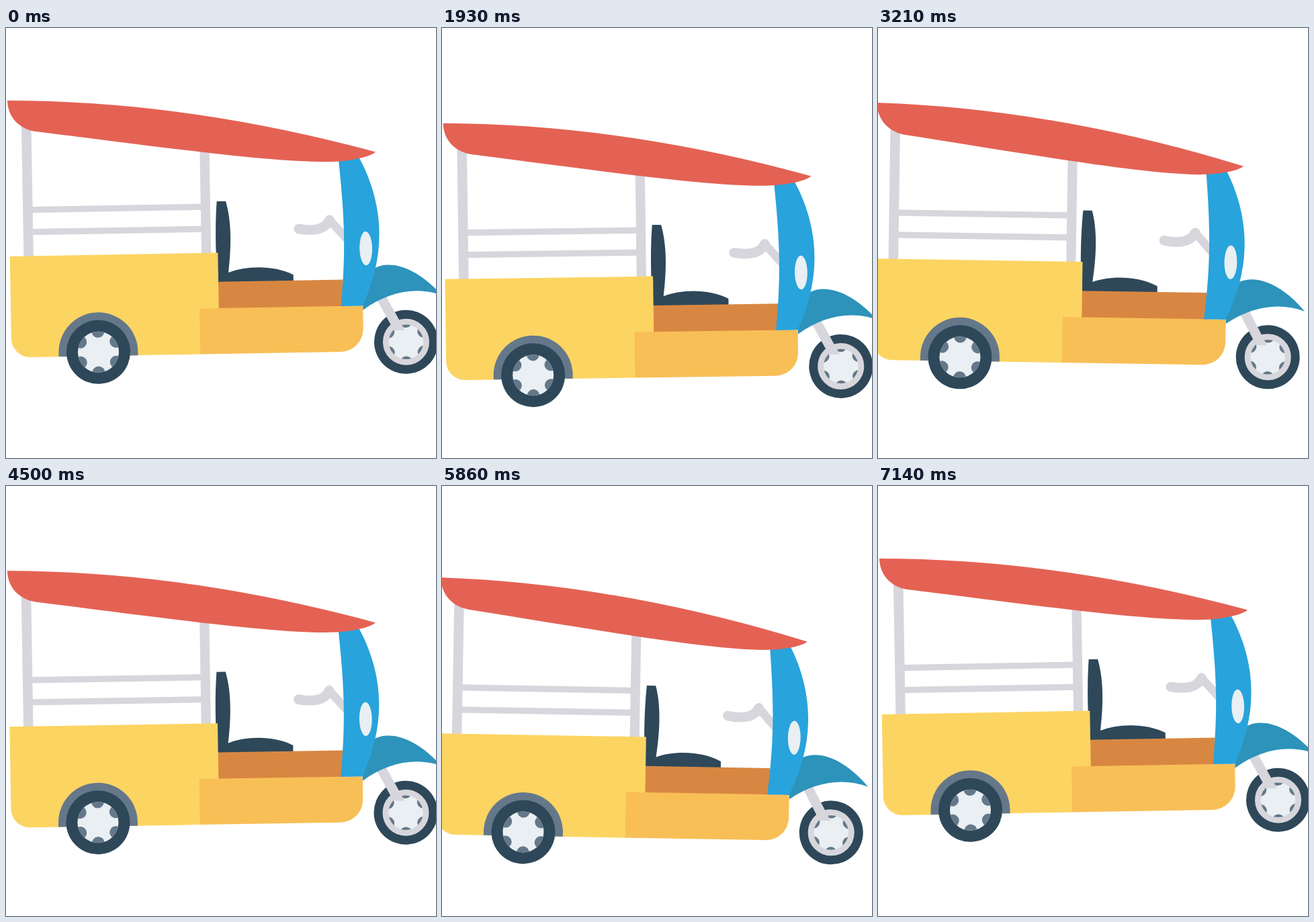
An HTML page for the animation above (7210 ms loop, 640x640 px).

```html
<!DOCTYPE html>
<html lang="en">
<head>
<meta charset="utf-8">
<title>Tuk-tuk</title>
<style>
html, body { margin: 0; width: 100%; height: 100%; overflow: hidden; background: #fff; }
svg { display: block; width: 100%; height: 100%; }
.dark { fill: #2e4859; }
.slate { fill: #65788a; }
.pale { fill: #e9eff2; }
.grey { fill: #d7d6dc; }
.bar { fill: none; stroke: #d7d6dc; stroke-linecap: round; stroke-linejoin: round; }
</style>
</head>
<body>
<svg viewBox="0 0 640 640">
  <defs>
    <clipPath id="hub"><circle r="30.5"/></clipPath>
    <g id="wheel">
      <circle class="dark" r="47.5"/>
      <circle class="pale" r="30.5"/>
      <g id="notches" class="slate" clip-path="url(#hub)"></g>
    </g>
  </defs>
  <g id="car">
    <!-- frame posts and rails -->
    <g class="grey">
      <rect x="20.6" y="145" width="14.5" height="196"/>
      <rect x="285.3" y="180" width="14.2" height="161"/>
      <rect x="30" y="266.6" width="260" height="9.2"/>
      <rect x="30" y="299.6" width="260" height="9.2"/>
    </g>
    <!-- seat -->
    <path class="dark" d="M309.3 263.5H322.6C330 290 331 325 324.8 369.8C350 360 392 359 421.4 374.6V384H309.3C306 350 306 300 309.3 263.5Z"/>
    <!-- handlebar -->
    <path class="bar" stroke-width="14.6" d="M430.6 306.5C452 310.5 470 308 476.6 294"/>
    <path class="bar" stroke-width="12.5" d="M476.6 294L503 324"/>
    <!-- body -->
    <rect x="309" y="383.3" width="186" height="40" fill="#d88742"/>
    <path fill="#fcd462" d="M0 340H309.6V423L281.5 490.5H28A28 28 0 0 1 0 462.5Z"/>
    <path fill="#f8bf57" d="M280.9 422.5H524V456.5A34 34 0 0 1 490 490.5H280.9Z"/>
    <!-- front wheel, fork and fender -->
    <g transform="translate(587.4 477.6)">
      <use href="#wheel"/>
      <circle r="30.1" fill="none" stroke="#d7d6dc" stroke-width="8.8"/>
    </g>
    <path class="grey" d="M543 410L556 404L586 460H573Q570 460 568 457Z"/>
    <path fill="#2d93bb" d="M524.2 429V420L543.5 366.5C570 354 609 371 641.2 408.6C603 395 562 402.5 524.2 429Z"/>
    <!-- windshield -->
    <path fill="#28a3dc" d="M491 198H520L522.8 203.2C542 240 551 280 550.3 316C550 352 540 388 524 422.7H491.5C499.5 345 500 300 491.7 205.6Z"/>
    <ellipse class="pale" cx="530" cy="337.3" rx="9.4" ry="25.2"/>
    <!-- roof -->
    <path fill="#e46254" d="M.3 108Q266.5 112.7 547 194.1C540 200 518 206.5 482 207.5C395 207.5 250 184.5 41.5 154.8C18 151 .3 133 .3 108Z"/>
    <!-- rear wheel -->
    <path class="slate" d="M70.2 490.5V484.6A59 59 0 0 1 188.2 484.6V490.5Z"/>
    <use href="#wheel" transform="translate(129.2 484.6)"/>
  </g>
</svg>
<script>
const LOOP = 7210, FPS = 14, FRAMES = 100;
const SWINGS = 3, DIPS = 2, TILT = 1, DROP = 34.4;
const car = document.getElementById('car');

document.getElementById('notches').innerHTML = Array.from({ length: 6 }, (_, i) =>
  `<circle cy="-30.5" r="9.3" transform="rotate(${i * 60})"/>`).join('');

// cubic-bezier(.4, 0, .2, 1)
function ease(x) {
  const cubic = (a, b, s) => 3 * (1 - s) ** 2 * s * a + 3 * (1 - s) * s * s * b + s ** 3;
  let lo = 0, hi = 1;
  for (let i = 0; i < 24; i++) {
    const mid = (lo + hi) / 2;
    if (cubic(.4, .2, mid) < x) lo = mid; else hi = mid;
  }
  return cubic(0, 1, lo);
}

function draw(ms) {
  const step = Math.min(FRAMES, Math.floor((ms % LOOP + 5) * FPS / 1000));
  const p = step / FRAMES;
  const swing = p * SWINGS % 1 * 2;
  const lean = swing < 1 ? ease(swing) : 1 - ease(swing - 1);
  const y = DROP * (1 - Math.cos(2 * Math.PI * DIPS * p)) / 2;
  car.setAttribute('transform', `translate(0 ${y}) rotate(${TILT * (2 * lean - 1)} 0 10)`);
}

const start = performance.now();
function tick() {
  draw(performance.now() - start);
  requestAnimationFrame(tick);
}
tick();
</script>
</body>
</html>
```
